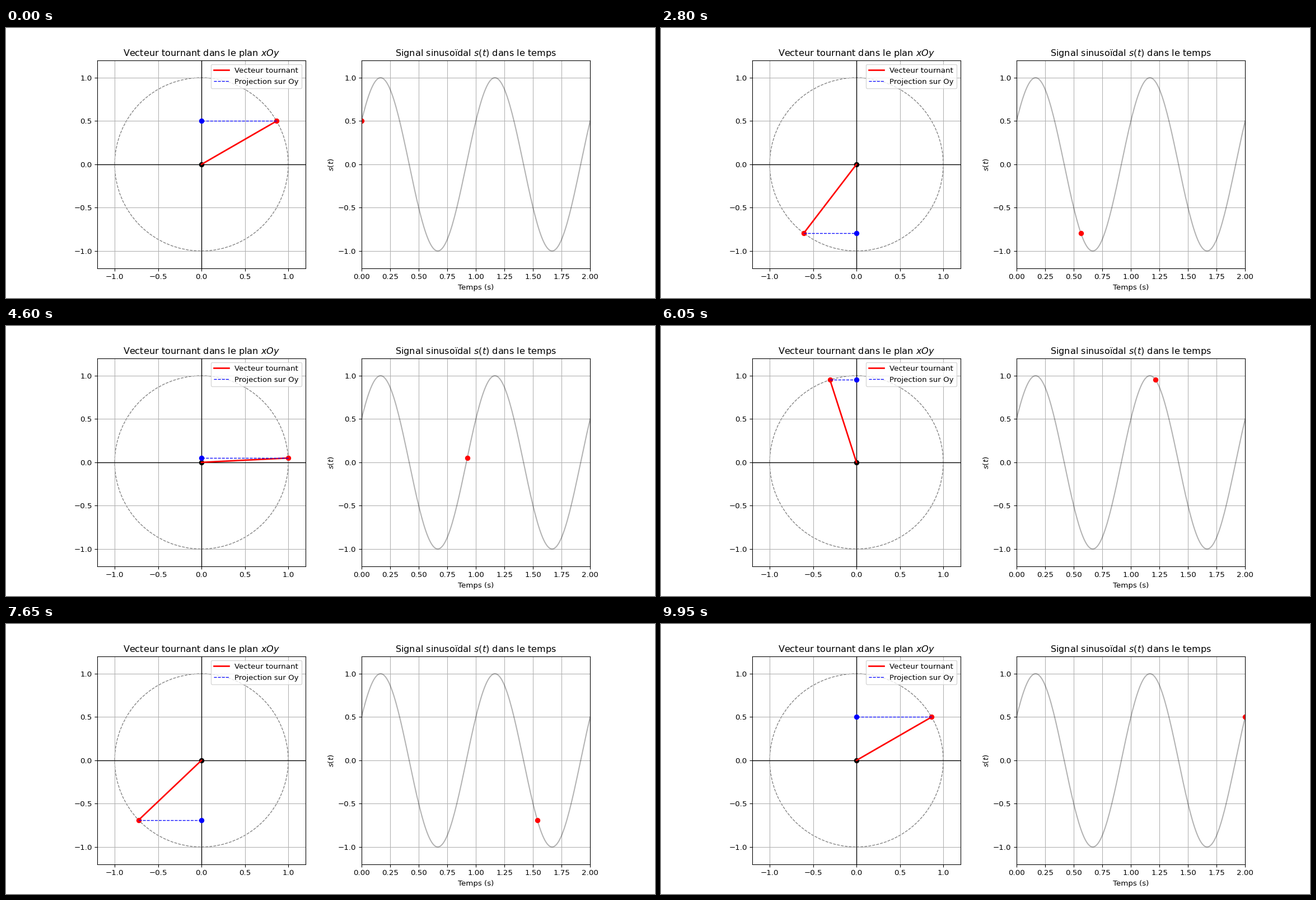
Animation of 1159 by 483 pixels, one loop 10 s. Source, as a matplotlib script:

```python
import numpy as np
import matplotlib.pyplot as plt
from matplotlib.animation import FuncAnimation

FRAMES, INTERVAL = 200, 50
DURATION, FREQ, PHASE = 2.0, 1.0, np.pi / 6

times = np.linspace(0, DURATION, FRAMES)
angles = 2 * np.pi * FREQ * times + PHASE

# 12 x 5 inches at 96.6 dpi fills 1159 x 483 pixels
fig, (plane, signal) = plt.subplots(1, 2, figsize=(12, 5), dpi=96.6)

# Rotating vector
plane.set_aspect("equal")
plane.set_xlim(-1.2, 1.2)
plane.set_ylim(-1.2, 1.2)
plane.set_xticks(np.arange(-1, 1.1, 0.5))
plane.set_yticks(np.arange(-1, 1.1, 0.5))
plane.grid(True)
plane.set_title("Vecteur tournant dans le plan $xOy$")
plane.axhline(0, color="black", lw=1)
plane.axvline(0, color="black", lw=1)
plane.add_patch(plt.Circle((0, 0), 1, fill=False, color="gray", ls="--", lw=1))
plane.plot(0, 0, "ko")
vector, = plane.plot([], [], "r-", lw=2, label="Vecteur tournant")
tip, = plane.plot([], [], "ro")
projection, = plane.plot([], [], "b--", lw=1, label="Projection sur Oy")
foot, = plane.plot([], [], "bo")
plane.legend(loc="upper right")

# Sine signal
signal.set_xlim(0, DURATION)
signal.set_ylim(-1.2, 1.2)
signal.grid(True)
signal.set_title("Signal sinusoïdal $s(t)$ dans le temps")
signal.set_xlabel("Temps (s)")
signal.set_ylabel("$s(t)$")
signal.plot(times, np.sin(angles), "k", alpha=0.3, lw=1.5)
marker, = signal.plot([], [], "ro")


def update(i):
    x, y = np.cos(angles[i]), np.sin(angles[i])
    vector.set_data([0, x], [0, y])
    tip.set_data([x], [y])
    projection.set_data([x, 0], [y, y])
    foot.set_data([0], [y])
    marker.set_data([times[i]], [y])
    return vector, tip, projection, foot, marker


anim = FuncAnimation(fig, update, frames=FRAMES, interval=INTERVAL,
                     init_func=lambda: update(0), repeat=True, repeat_delay=0)
plt.show()
```
